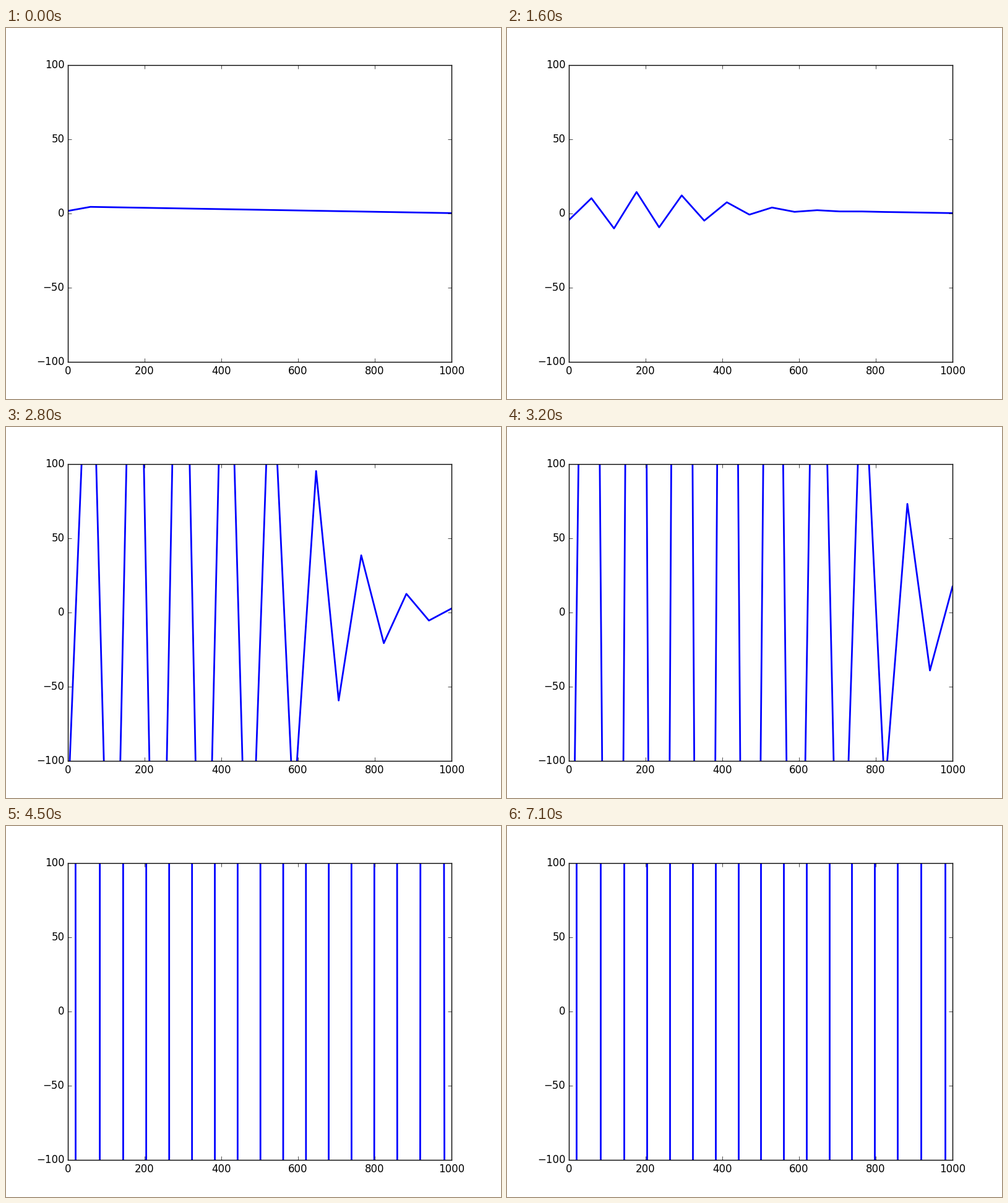
Write a matplotlib script that moves like this. It is 800 px wide and 600 px high and loops after 8 s.

```python
import numpy as np
import matplotlib.pyplot as plt
from matplotlib.animation import FuncAnimation

FRAMES = 80
INTERVAL = 100  # ms
POINTS = 18
R = 0.6  # diffusion number, above the stability limit of 0.5


def step(u):
    """One explicit heat-equation step with zero temperature at both ends."""
    padded = np.pad(u, 1)
    return u + R * (padded[2:] - 2 * u + padded[:-2])


def simulate(u, count):
    states = []
    for _ in range(count):
        u = step(u)
        states.append(u)
    return states


plt.style.use("classic")
plt.rcParams["font.family"] = "DejaVu Sans"

x = np.linspace(0, 1000, POINTS)
states = simulate(np.linspace(5, 0, POINTS + 2)[1:-1], FRAMES)

fig = plt.figure(figsize=(8, 6), dpi=100, facecolor="white")
ax = fig.add_axes([0.125, 0.1, 0.775, 0.8])
ax.set_xlim(0, 1000)
ax.set_ylim(-100, 100)
ax.set_xticks(range(0, 1001, 200))
ax.set_yticks(range(-100, 101, 50))
line, = ax.plot(x, states[0], color="blue", lw=2, scalex=False, scaley=False)


def draw(i):
    line.set_ydata(states[i])
    return line,


anim = FuncAnimation(fig, draw, frames=FRAMES, interval=INTERVAL,
                     repeat=True, repeat_delay=0)
plt.show()
```
